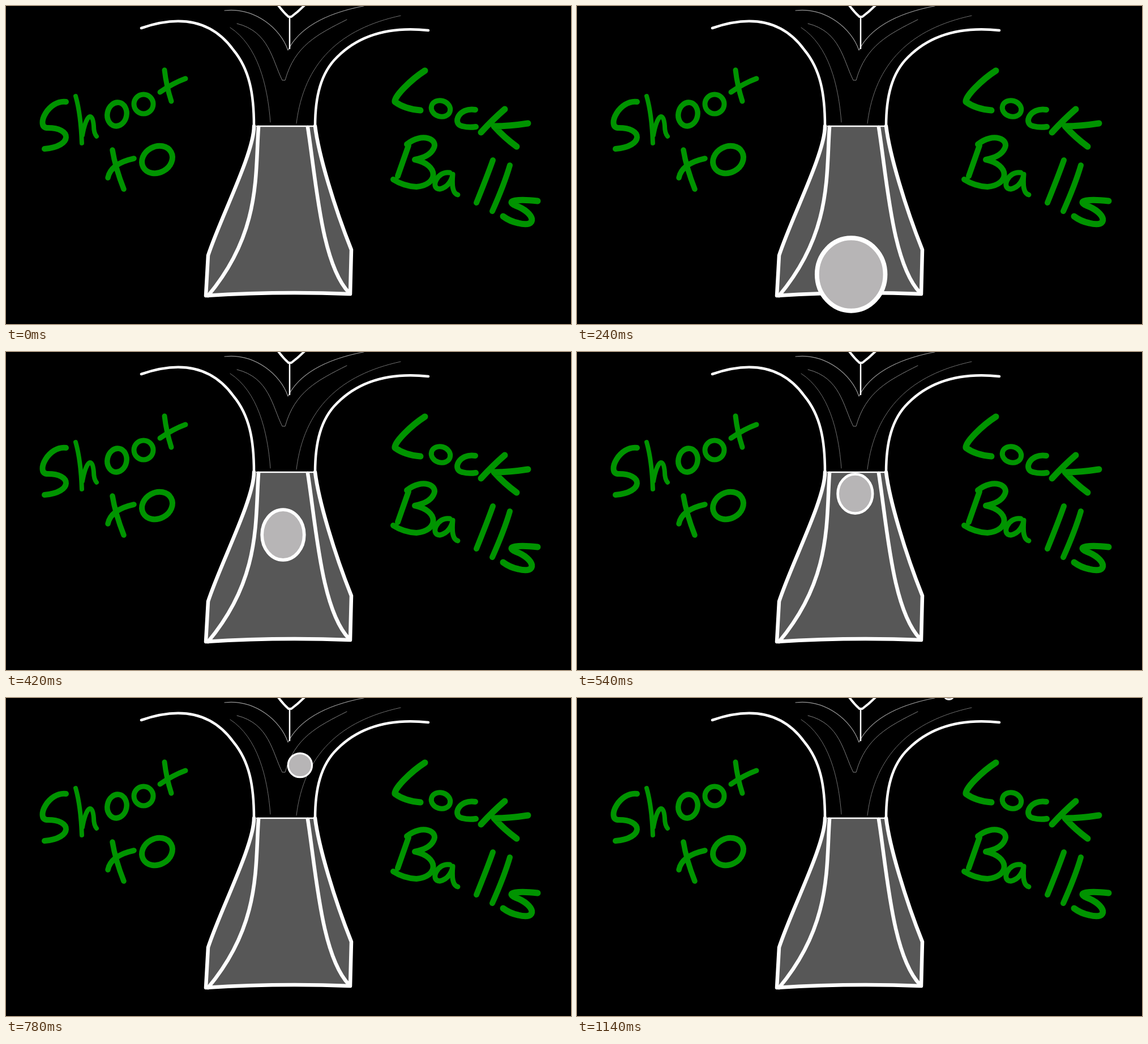
Recreate the animation shown at these times as an HTML page with a canvas. Size 998x561 px, loop 1200 ms.

```html
<!DOCTYPE html>
<html lang="en">
<head>
<meta charset="utf-8">
<title>Shoot to lock balls</title>
<style>
html, body { margin: 0; width: 100%; height: 100%; overflow: hidden; background: #000; }
canvas { display: block; }
</style>
</head>
<body>
<canvas id="stage" width="998" height="561" role="img" aria-label="Shoot to Lock Balls"></canvas>
<script>
const WHITE = '#fff', GREEN = '#009400', RAMP = '#575757', BALL = '#b7b5b6';
const STEP = 60, STEPS = 20, FORK = 11;

const ctx = document.getElementById('stage').getContext('2d');
ctx.lineCap = ctx.lineJoin = 'round';

function ink(color, width, d) {
  ctx.strokeStyle = color;
  ctx.lineWidth = width;
  ctx.stroke(new Path2D(d));
}

function ring(x, y, rx, ry, tilt, width) {
  ctx.strokeStyle = GREEN;
  ctx.lineWidth = width;
  ctx.beginPath();
  ctx.ellipse(x, y, rx, ry, tilt, 0, Math.PI * 2);
  ctx.stroke();
}

function drawLane() {
  const left = 'M438 212C438 260 378 375 357 440L353 511';
  const base = 'Q480 503 608 508';
  const right = 'L610 430C580 355 552 262 546 212';
  ctx.fillStyle = RAMP;
  ctx.fill(new Path2D(left + base + right));

  // Faint lines inside the fork
  ink('#999', 1.2, 'M386 8C440 2 485 40 498 78C520 35 570 12 632 0');
  ink('#808080', 1, 'M408 31C465 45 470 95 488 131H493C510 70 550 50 602 24');
  ink('#707070', 1, 'M396 38C445 70 462 140 467 205M513 207C526 100 590 40 697 17');
  ink(WHITE, 4, 'M481 -1Q490 11 499 19H504Q516 10 527 -1');
  ink(WHITE, 2.5, 'M501 19V75');

  // Walls, rails and edges
  ink(WHITE, 4.5, 'M239 39C300 18 360 20 402 78C430 112 438 155 438 212');
  ink(WHITE, 4.5, 'M746 43C680 36 625 50 585 90C556 118 546 160 546 212');
  ink(WHITE, 6.5, left + base + right);
  ink(WHITE, 6.5, 'M446 214C440 300 450 400 357 511M533 214C548 310 557 455 606 506');
  ink(WHITE, 2.5, 'M443 212H543');
}

function drawLettering() {
  // Shoot
  ink(GREEN, 10, 'M106 169C75 165 52 212 72 215C118 214 118 248 68 252');
  ink(GREEN, 8, 'M123 159Q132 190 134 242M135 228C142 190 153 185 155 212Q155 224 160 230');
  ring(196, 191, 17, 21, 0.2, 9.5);
  ring(243, 173, 17, 17, 0, 9);
  ink(GREEN, 9, 'M280 113Q283 140 292 168M272 152Q295 136 317 128');

  // to
  ink(GREEN, 9.5, 'M188 254Q193 285 208 323M180 303Q185 278 226 269');
  ring(267, 271, 28, 23, -0.5, 10);

  // Lock
  ink(GREEN, 11, 'M740 114C715 130 685 160 687 169Q705 182 732 184');
  ring(768, 181, 17, 14, 0.3, 9);
  ink(GREEN, 10, 'M829 183C800 178 787 208 806 212Q818 215 830 213');
  ink(GREEN, 11, 'M881 182Q860 200 839 223M922 207Q890 212 862 212Q880 232 902 248');

  // Balls
  ink(GREEN, 10, 'M711 246L692 300M708 244C735 222 765 235 755 252Q748 266 722 271C765 280 765 315 725 319Q703 318 684 306');
  ink(GREEN, 9, 'M784 294C762 290 748 322 766 323C782 320 788 305 789 297Q786 330 798 333');
  ink(GREEN, 10, 'M860 272Q850 300 831 347M890 281Q880 315 859 362');
  ink(GREEN, 11, 'M939 344C905 340 880 343 900 352C935 365 940 392 905 383Q890 380 878 371');
}

// The ball slows up the ramp, then curves into the right branch
function ballAt(step) {
  const m = FORK - step;
  if (m >= 0) return [492 - 0.16 * m * m, 200 + 19.4 * m + 2.81 * m * m];
  const u = -m / 8;
  return [492 + 91 * u + 74 * u * u, 200 - 365 * u + 158 * u * u];
}

function drawBall(step) {
  const [x, y] = ballAt(step);
  const r = 111 * Math.exp(-0.122 * step);
  const line = 1 + r / 10;
  const onRamp = step > 3 && step < FORK;
  const squeeze = onRamp ? 1 - 0.15 * Math.sin(Math.PI * (step - 3) / 8) : 1;
  ctx.beginPath();
  ctx.ellipse(x, y, r * squeeze - line / 2, r - line / 2, 0, 0, Math.PI * 2);
  ctx.fillStyle = BALL;
  ctx.fill();
  ctx.strokeStyle = WHITE;
  ctx.lineWidth = line;
  ctx.stroke();
}

function frame() {
  ctx.clearRect(0, 0, 998, 561);
  drawLane();
  drawLettering();
  drawBall(Math.floor(performance.now() / STEP) % STEPS);
  requestAnimationFrame(frame);
}

frame();
</script>
</body>
</html>
```
